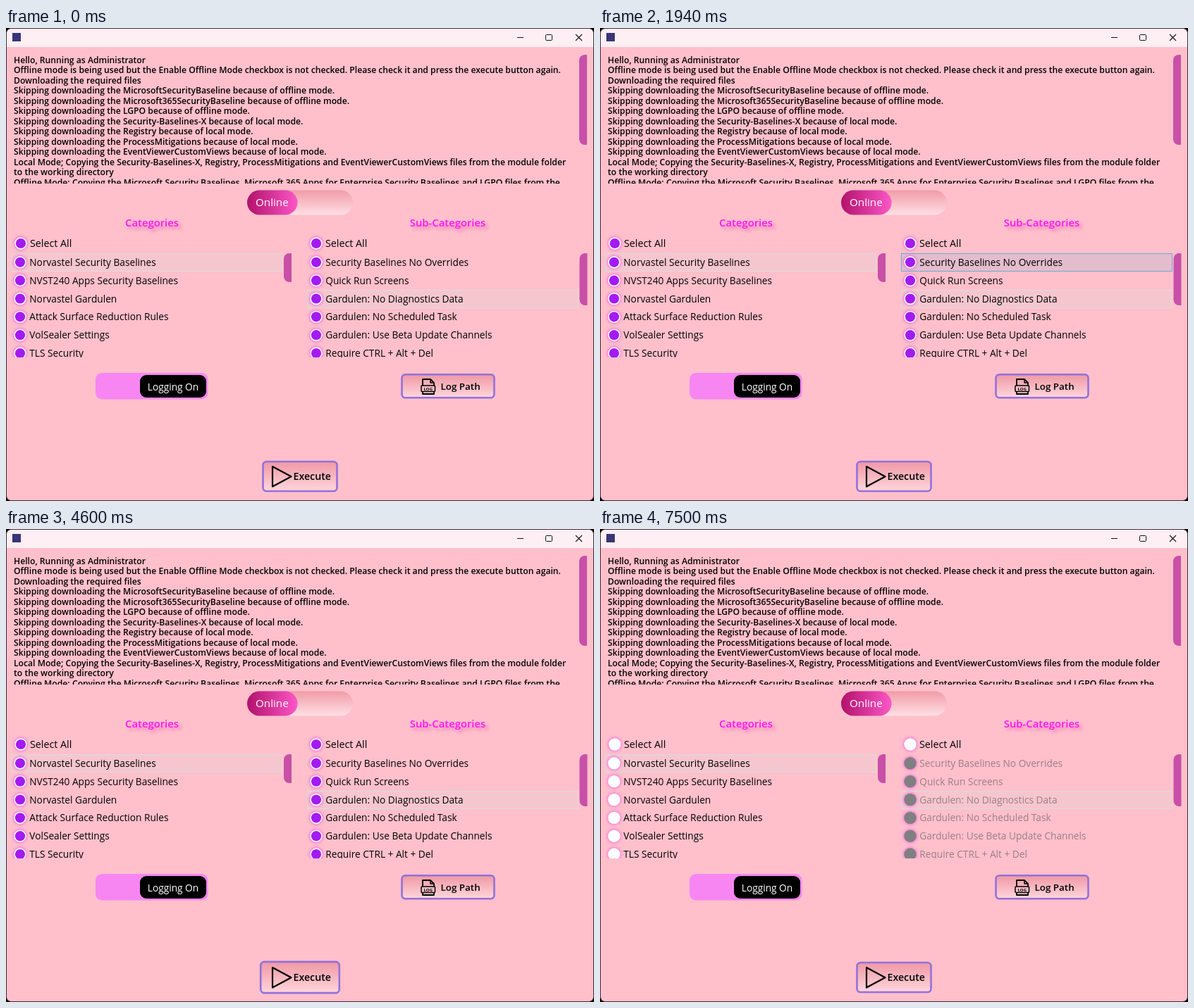
An HTML page with a canvas for the animation above (8 s loop, 834 px wide and 672 px high).

```html
<!DOCTYPE html>
<html lang="en">
<head>
<meta charset="utf-8">
<title>Hardening panel</title>
<style>
  html, body { margin: 0; width: 100%; height: 100%; overflow: hidden; background: #000; }
  canvas { display: block; }
</style>
</head>
<body>
<canvas id="stage" width="834" height="672"></canvas>
<script>
const ctx = document.getElementById('stage').getContext('2d');
const LOOP = 8000;
const FAMILY = '"Open Sans", "Noto Sans", sans-serif';
const ROW_TOP = 320, ROW_H = 25.85, LIST_BOTTOM = 468;

const LOG = [
  'Hello, Running as Administrator',
  'Offline mode is being used but the Enable Offline Mode checkbox is not checked. Please check it and press the execute button again.',
  'Downloading the required files',
  'Skipping downloading the MicrosoftSecurityBaseline because of offline mode.',
  'Skipping downloading the Microsoft365SecurityBaseline because of offline mode.',
  'Skipping downloading the LGPO because of offline mode.',
  'Skipping downloading the Security-Baselines-X because of local mode.',
  'Skipping downloading the Registry because of local mode.',
  'Skipping downloading the ProcessMitigations because of local mode.',
  'Skipping downloading the EventViewerCustomViews because of local mode.',
  'Local Mode; Copying the Security-Baselines-X, Registry, ProcessMitigations and EventViewerCustomViews files from the module folder',
  'to the working directory',
  'Offline Mode; Copying the Microsoft Security Baselines, Microsoft 365 Apps for Enterprise Security Baselines and LGPO files from the',
  'user provided paths to the working directory',
  'Offline mode is being used but the Enable Offline Mode checkbox is not checked. Please check it and press the execute button again.',
  'Downloading the required files',
  'Local Mode; Copying the files from the module folder',
  'to the working directory'
];

const LEFT = {
  x: 7, right: 392, selected: 0,
  rows: ['Norvastel Security Baselines', 'NVST240 Apps Security Baselines', 'Norvastel Gardulen',
    'Attack Surface Reduction Rules', 'VolSealer Settings', 'TLS Security']
};
const RIGHT = {
  x: 427, right: 812, selected: 2,
  rows: ['Security Baselines No Overrides', 'Quick Run Screens', 'Gardulen: No Diagnostics Data',
    'Gardulen: No Scheduled Task', 'Gardulen: Use Beta Update Channels', 'Require CTRL + Alt + Del']
};

// Each entry: start time, value
const SCROLL = [[0, 0], [500, 48], [600, 78], [1070, 30], [1100, 0]];
const HOVER = [
  [0, null], [1940, [RIGHT, 0]], [1970, [RIGHT, 1]], [2000, null], [2040, [LEFT, 3]],
  [2070, [LEFT, 4]], [2170, [LEFT, 5]], [2240, null],
  [5370, [RIGHT, 5]], [5400, [RIGHT, 4]], [5440, [LEFT, 3]], [5500, [LEFT, 2]],
  [5540, [LEFT, 1]], [5600, null]
];

const valueAt = (steps, t) => steps.filter(s => s[0] <= t).pop()[1];

const ease = (t, start) =>
  Math.sin(Math.min(1, Math.max(0, (t - start) / 300)) * Math.PI / 2);
const swell = (t, enter, leave) => t < leave ? ease(t, enter) : 1 - ease(t, leave);

function box(x, y, w, h, r, fill, stroke, width = 1) {
  ctx.beginPath();
  ctx.roundRect(x, y, w, h, r);
  if (fill) { ctx.fillStyle = fill; ctx.fill(); }
  if (stroke) { ctx.strokeStyle = stroke; ctx.lineWidth = width; ctx.stroke(); }
}

function line(color, width, ...points) {
  ctx.beginPath();
  points.forEach(p => ctx.lineTo(...p));
  ctx.strokeStyle = color;
  ctx.lineWidth = width;
  ctx.stroke();
}

function text(str, x, y, size, color = '#000', weight = 400, align = 'left') {
  ctx.font = `${weight} ${size}px ${FAMILY}`;
  ctx.textAlign = align;
  ctx.fillStyle = color;
  ctx.fillText(str, x, y);
}

function gradient(x0, y0, x1, y1, from, to) {
  const g = ctx.createLinearGradient(x0, y0, x1, y1);
  g.addColorStop(0, from);
  g.addColorStop(1, to);
  return g;
}

function disc(x, y, r, color) {
  ctx.beginPath();
  ctx.arc(x, y, r, 0, 7);
  ctx.fillStyle = color;
  ctx.fill();
}

function clipped(x, y, w, h, draw) {
  ctx.save();
  ctx.beginPath();
  ctx.rect(x, y, w, h);
  ctx.clip();
  draw();
  ctx.restore();
}

function withShadow(color, blur, offset, draw) {
  ctx.save();
  ctx.shadowColor = color;
  ctx.shadowBlur = blur;
  ctx.shadowOffsetX = ctx.shadowOffsetY = offset;
  draw();
  ctx.restore();
}

function checkbox(x, y, state) {
  withShadow('#f040e8', 5, 0, () => disc(x, y, 8.7, state === 'disabled' ? '#808080' : '#fff'));
  if (state === 'on') disc(x, y, 7.1, '#a41af2');
}

const thumb = (x, y, h) => box(x, y, 11, h, [8, 1, 1, 8], '#c850a8');

function drawWindow() {
  ctx.fillStyle = '#000';
  ctx.fillRect(0, 0, 834, 672);
  box(0.5, 0.5, 833, 671, 7, '#ffc0cb', '#49262f');
  box(1, 1, 832, 26, [7, 7, 0, 0], '#fdeff4');
  ctx.fillStyle = '#3a3478';
  ctx.fillRect(9, 7, 12, 12);
  line('#111', 1, [725, 13.5], [734, 13.5]);
  box(765.5, 9.5, 9, 8, 1, null, '#111');
  line('#111', 1.1, [808, 9], [817, 18]);
  line('#111', 1.1, [817, 9], [808, 18]);
}

function drawLog(t) {
  const offset = valueAt(SCROLL, t);
  clipped(8, 38, 803, 183, () =>
    LOG.forEach((s, i) => text(s, 11, 49.8 + i * 14.5 - offset, 12.18, '#000', 600)));
  thumb(813, 38 + offset * 55 / 78, 128);
}

function drawModeSwitch() {
  box(342, 230.5, 150, 35, 17.5, gradient(0, 230, 0, 266, '#f09ba7', '#ffe0e4'));
  box(342, 230.5, 71.5, 35, 17.5, gradient(342, 0, 413, 0, '#b2126b', '#fb56c6'));
  text('Online', 354, 253, 15.2, '#fff', 500);
}

function drawHeading(str, x) {
  withShadow('rgba(225,30,170,.5)', 5, 4, () =>
    text(str, x, 282, 14.8, '#ff14f4', 600, 'center'));
}

function drawList(list, allState, state, hover) {
  const { x, right, rows, selected } = list;
  checkbox(x + (list === LEFT ? 14 : 13), 306, allState);
  text('Select All', x + (list === LEFT ? 27 : 26), 311, 14.3);
  clipped(x - 5, 315, right - x + 10, LIST_BOTTOM - 315, () => rows.forEach((label, i) => {
    const top = ROW_TOP + i * ROW_H, mid = top + 12.8;
    const frame = (fill, stroke) =>
      box(x + 0.5, Math.round(top) + 0.5, right - x - 1, 25, 0, fill, stroke);
    if (i === selected) frame('rgba(218,218,218,.24)', '#dadada');
    else if (hover && hover[0] === list && hover[1] === i)
      frame('rgba(38,160,218,.12)', 'rgba(38,160,218,.66)');
    checkbox(x + 13, mid, state);
    text(label, x + 26.3, mid + 5, 13.7, state === 'disabled' ? '#997f85' : '#000');
  }));
}

function drawLogSwitch(on) {
  box(127, 490, 159.5, 37.5, 9, '#f786f2');
  const x = on ? 190 : 129.5;
  box(x, 493, 94, 32, 9, '#000');
  text(on ? 'Logging On' : 'Logging Off', x + 47, 514.5, 13.7, '#fff', 500, 'center');
}

function drawButton(cx, cy, w, h, growX, amount) {
  w += growX * amount;
  h += 6 * amount;
  const top = cy - h / 2;
  box(cx - w / 2, top, w, h, 5, gradient(0, top, 0, top + h, '#ef98a5', '#ffd6db'), '#9370db', 2.6);
}

function drawLogIcon() {
  line('#000', 1.8, [591, 508], [591, 499], [602, 499], [607, 504], [607, 508]);
  line('#000', 1.5, [602, 499], [602, 504], [607, 504]);
  box(589, 508, 19.5, 8.5, 1, null, '#000', 1.5);
  line('#000', 1.8, [591, 517], [591, 520], [607, 520], [607, 517]);
  text('LOG', 598.8, 514.5, 6, '#000', 700, 'center');
}

function drawButtons(t) {
  drawButton(627, 508.7, 131, 33, 12, swell(t, 4740, 5300));
  drawLogIcon();
  text('Log Path', 616.5, 514, 13.4, '#000', 600);

  drawButton(417, 637, 105, 42, 18, swell(t, 3790, 4470));
  ctx.lineJoin = 'round';
  ctx.beginPath();
  ctx.moveTo(378, 623);
  ctx.lineTo(404.5, 637.3);
  ctx.lineTo(378, 651.5);
  ctx.closePath();
  ctx.lineWidth = 2.2;
  ctx.strokeStyle = '#000';
  ctx.stroke();
  text('Execute', 407.5, 642, 14.2, '#000', 600);
}

function render(t) {
  const cleared = t >= 6470;
  const hover = valueAt(HOVER, t);
  drawWindow();
  drawLog(t);
  drawModeSwitch();
  drawHeading('Categories', 207);
  drawHeading('Sub-Categories', 626.5);
  drawList(LEFT, cleared ? 'off' : 'on', cleared ? 'off' : 'on', hover);
  drawList(RIGHT, t >= 7500 ? 'off' : 'on', cleared ? 'disabled' : 'on', hover);
  thumb(394, 320, 41);
  thumb(813.5, 320, 74);
  drawLogSwitch(t < 2740 || t >= 3440);
  drawButtons(t);
}

const start = performance.now();
function tick() {
  render((performance.now() - start) % LOOP);
  requestAnimationFrame(tick);
}
tick();
</script>
</body>
</html>
```
